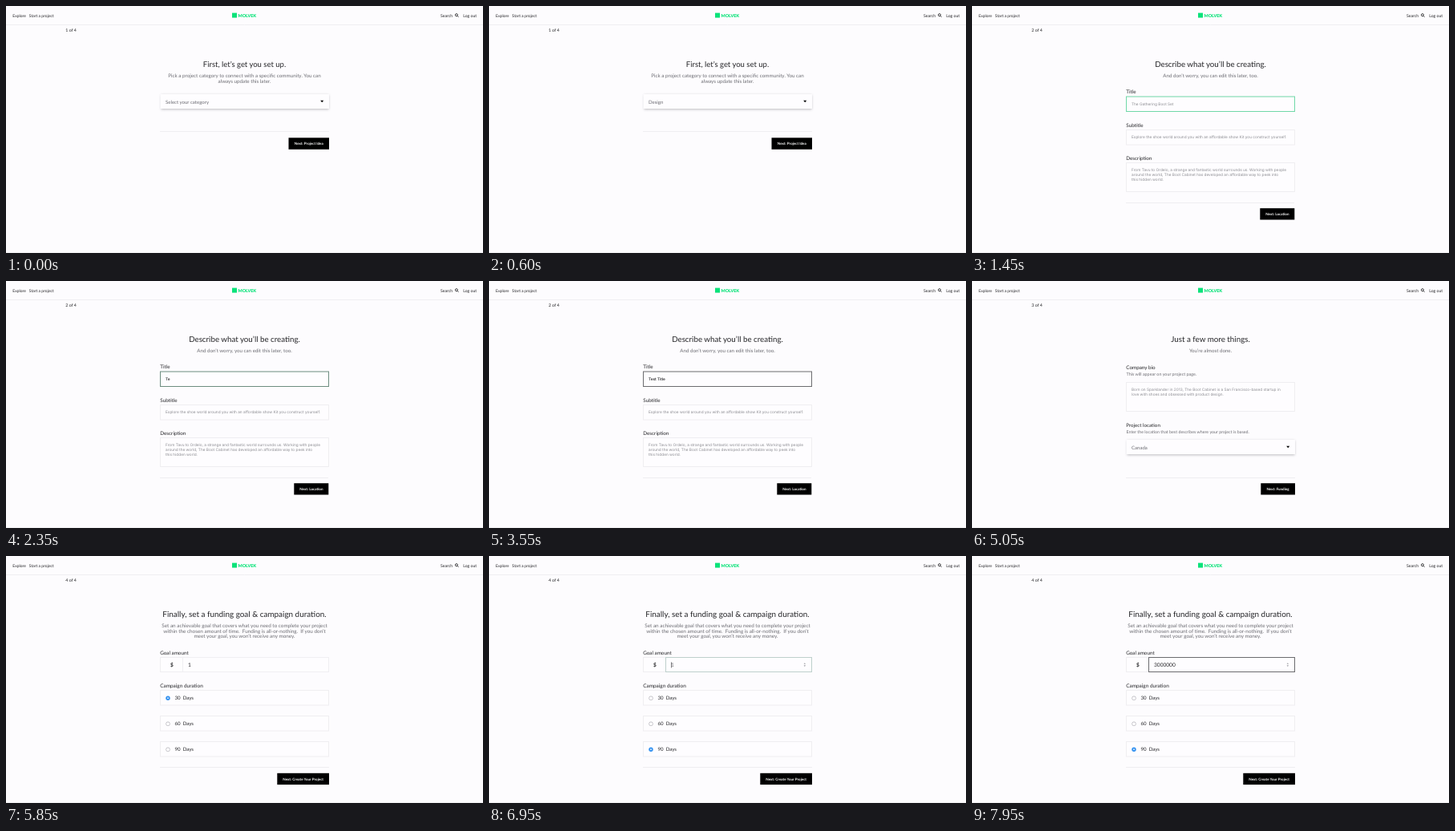
Recreate the animation shown at these times as an HTML page with a canvas. Size 595 by 308 pixels, loop 8000 ms.

```html
<!DOCTYPE html>
<html lang="en">
<head>
<meta charset="utf-8">
<title>Project setup</title>
<style>
html, body { margin: 0; width: 100%; height: 100%; overflow: hidden; background: #fdfcfe; }
canvas { display: block; width: 595px; height: 308px; }
</style>
</head>
<body>
<canvas id="stage"></canvas>
<script>
const W = 595, H = 308, LOOP = 8000;
const LEFT = 192.5, RIGHT = 402.5;
const INK = '#252528', SOFT = '#6c6c72', HINT = '#8c8c91', GREEN = '#0be37a';
const SANS = 'Lato, "Open Sans", sans-serif', FORM = 'Inter, "Liberation Sans", sans-serif';
const PALE = [240, 239, 242], FOCUS = [112, 216, 168], DARK = [108, 108, 111], BLACK = [40, 40, 43];
const LINE = '#efeef1';

const canvas = document.getElementById('stage');
const ctx = canvas.getContext('2d');
const dpr = window.devicePixelRatio || 1;
canvas.width = W * dpr;
canvas.height = H * dpr;

const ramp = (t, a, b) => Math.min(1, Math.max(0, (t - a) / (b - a)));
const ease = k => k * k * (3 - 2 * k);
const mix = (a, b, k) => `rgb(${a.map((v, i) => Math.round(v + (b[i] - v) * k))})`;

// y is the middle of the capital letters
function text(str, x, y, size, color = INK, opt = {}) {
  const { weight = 400, align = 'left', family = SANS } = opt;
  ctx.font = `${weight} ${size}px ${family}`;
  ctx.textAlign = align;
  ctx.fillStyle = color;
  ctx.fillText(str, x, y + size * 0.36);
}

function centred(lines, y, size, color, step = 6.6) {
  lines.forEach((s, i) => text(s, 297.5, y + i * step, size, color, { align: 'center' }));
}

function hint(lines, y) {
  lines.forEach((s, i) => text(s, 199, y + i * 6, 4.76, HINT, { family: FORM }));
}

function rule(x1, x2, y) {
  ctx.strokeStyle = LINE;
  ctx.lineWidth = 1;
  ctx.beginPath();
  ctx.moveTo(x1, y);
  ctx.lineTo(x2, y);
  ctx.stroke();
}

function frame(x, y, right, bottom, color = LINE) {
  ctx.fillStyle = '#fefdff';
  ctx.fillRect(x, y, right - x, bottom - y);
  ctx.strokeStyle = color;
  ctx.lineWidth = 1;
  ctx.strokeRect(x, y, right - x, bottom - y);
}

function triangle(x, y, w, h, color) {
  ctx.fillStyle = color;
  ctx.beginPath();
  ctx.moveTo(x - w / 2, y - h / 2);
  ctx.lineTo(x + w / 2, y - h / 2);
  ctx.lineTo(x, y + h / 2);
  ctx.fill();
}

function disc(x, y, r, color) {
  ctx.fillStyle = color;
  ctx.beginPath();
  ctx.arc(x, y, r, 0, 7);
  ctx.fill();
}

function raised(y, h) {
  ctx.save();
  ctx.shadowColor = 'rgba(30,30,40,.3)';
  ctx.shadowBlur = 3 * dpr;
  ctx.shadowOffsetY = dpr;
  ctx.fillStyle = '#fefdff';
  ctx.fillRect(192.5, y, 210.5, h);
  ctx.restore();
}

function select(y, label, tone) {
  raised(y, 18);
  text(label, 199, y + 9.4, 6.05, mix([108, 108, 114], BLACK, tone));
  triangle(394.2, y + 9, 4, 2.4, '#000');
}

function menu(y, items, open, active) {
  if (open <= 0) return;
  const row = 18, h = Math.min(items.length * row, H - 1 - y) * open;
  raised(y, h);
  ctx.save();
  ctx.beginPath();
  ctx.rect(192, y, 212, h);
  ctx.clip();
  items.forEach((s, i) => {
    if (i === active) {
      ctx.fillStyle = '#f0eff3';
      ctx.fillRect(192.5, y + i * row, 210.5, row);
    }
    text(s, 199, y + i * row + 9, 6.05, SOFT);
  });
  ctx.restore();
}

function button(label, x, y, hover = 0, h = 14.5, right = 403) {
  ctx.fillStyle = mix([0, 0, 0], [42, 42, 42], hover);
  ctx.fillRect(x, y, right - x, h);
  text(label, (x + right) / 2, y + h / 2 + 0.2, 4.5, '#fff', { weight: 700, align: 'center' });
}

function header(step) {
  text('Explore', 8.3, 12, 5);
  text('Start a project', 28.8, 12, 5);
  ctx.fillStyle = GREEN;
  ctx.fillRect(282, 8.6, 6, 6);
  text('MOLVEK', 289.5, 11.7, 5.4, GREEN, { weight: 900 });
  text('Search', 542, 12, 5.15);
  ctx.strokeStyle = INK;
  ctx.lineWidth = 0.9;
  ctx.beginPath();
  ctx.arc(561.9, 11.2, 1.5, 0, 7);
  ctx.moveTo(563, 12.3);
  ctx.lineTo(564.5, 13.8);
  ctx.stroke();
  text('Log out', 570.2, 12, 5.15);
  rule(0, W, 23.5);
  rule(0, W, 307.5);
  text(`${step} of 4`, 74.3, 29.7, 5.3);
}

function categoryPage(t) {
  centred(['First, let’s get you set up.'], 72.3, 9.5, INK);
  centred(['Pick a project category to connect with a specific community. You can',
    'always update this later.'], 87, 6.28, SOFT);
  rule(192, 403, 156.5);
  button('Next: Project Idea', 352.5, 164.3, ramp(t, 750, 950));
  select(110, t < 600 ? 'Select your category' : 'Design', ramp(t, 700, 950));
  const open = ease(ramp(t, 0, 200)) * (1 - ramp(t, 500, 600));
  menu(129, ['Art', 'Comics', 'Crafts', 'Dance', 'Design'], t < 50 ? 0 : open,
    Math.floor(ramp(t, 200, 440) * 4));
}

function ideaPage(t) {
  centred(['Describe what you’ll be creating.'], 72.3, 9.75, INK);
  centred(['And don’t worry, you can edit this later, too.'], 86.8, 6.2, SOFT);
  text('Title', 192.3, 107.2, 6.3);
  const typed = Math.floor(ramp(t, 2190, 2850) * 11);
  const edge = typed
    ? mix(FOCUS, DARK, ramp(t, 2240, 2400))
    : mix(PALE, FOCUS, ease(ramp(t, 1300, 1450)));
  frame(LEFT, 113, RIGHT, 131.5, edge);
  if (typed) {
    text('Test Title'.slice(0, typed), 199, 122, 4.76, '#151517', { family: FORM, weight: 500 });
  } else {
    hint(['The Gathering Boot Set'], 122);
  }
  text('Subtitle', 192.3, 148.7, 6.3);
  frame(LEFT, 154.5, RIGHT, 173);
  hint(['Explore the shoe world around you with an affordable show Kit you construct yourself.'], 163.3);
  text('Description', 192.3, 190, 6.3);
  frame(LEFT, 195.5, RIGHT, 231.5);
  hint(['From Tavu to Ordelo, a strange and fantastic world surrounds us. Working with people',
    'around the world, The Boot Cabinet has developed an affordable way to peek into',
    'this hidden world.'], 204.7);
  rule(192, 402, 245.5);
  button('Next: Location', 359.3, 252.2, ramp(t, 3800, 4000), 14.3, 402.3);
}

function placePage(t) {
  centred(['Just a few more things.'], 72.3, 9.8, INK);
  centred(['You’re almost done.'], 86.8, 6.2, SOFT);
  text('Company bio', 192.3, 107.3, 6.3);
  text('This will appear on your project page.', 192.5, 116, 5.38, SOFT);
  frame(LEFT, 126.5, RIGHT, 162.5);
  hint(['Born on Sparklander in 2013, The Boot Cabinet is a San Francisco-based startup in',
    'love with shoes and obsessed with product design.'], 135.2);
  text('Project location', 192.3, 179.4, 6.2);
  text('Enter the location that best describes where your project is based.', 192.5, 188, 5.32, SOFT);
  rule(192, 403, 245.5);
  button('Next: Funding', 360.3, 252.2, t < 4400 ? 1 - ramp(t, 4100, 4350) : ramp(t, 5150, 5300), 14.3);
  select(198, t < 5050 ? 'Select your country' : 'Canada', ramp(t, 5150, 5300));
  const open = ease(ramp(t, 4650, 4800)) * (1 - ramp(t, 4980, 5050));
  menu(217, ['Australia', 'Austria', 'Belgium', 'Canada', 'Denmark'], t < 4700 ? 0 : open,
    Math.floor(ramp(t, 4800, 4940) * 3));
}

function option(y, label, on) {
  frame(LEFT, y, RIGHT, y + 18.5);
  const cy = y + 9.7;
  if (on) {
    disc(202, cy, 2.7, '#3492f0');
    disc(202, cy, 0.9, '#e9f3ff');
  } else {
    disc(202, cy, 2.6, '#b8b7bd');
    disc(202, cy, 2, '#fefdff');
  }
  text(label, 210.5, cy + 0.1, 6.1);
}

function amount(t) {
  if (t < 7150) return '1';
  const keys = [7400, 7450, 7500, 7700, 7850, 7900];
  return '3' + '0'.repeat(keys.filter(k => t >= k).length);
}

function goalPage(t) {
  centred(['Finally, set a funding goal & campaign duration.'], 72.3, 9.92, INK);
  centred(['Set an achievable goal that covers what you need to complete your project',
    'within the chosen amount of time.  Funding is all-or-nothing.  If you don’t',
    'meet your goal, you won’t receive any money.'], 87, 6.35, SOFT);
  text('Goal amount', 192.2, 120.5, 6.3);
  frame(LEFT, 126.5, RIGHT, 144.5);
  const touch = [190, 208, 204];
  const edge = t < 7050
    ? mix(PALE, touch, ramp(t, 6800, 6950))
    : mix(touch, DARK, ramp(t, 7050, 7200));
  frame(220.5, 126.5, RIGHT, 144.5, edge);
  text('$', 206.8, 135.4, 6.5, INK, { weight: 700, align: 'center' });
  const editing = t >= 6900 && t < 7150;
  text(amount(t), 227, 135.7, 6.6, editing ? '#77767c' : INK);
  if (editing) {
    ctx.fillStyle = INK;
    ctx.fillRect(227, 132.4, 0.6, 7);
  }
  const spin = ramp(t, 6650, 6800);
  if (spin) {
    const grey = mix([254, 253, 255], [150, 150, 156], spin);
    triangle(393.8, 134, 2.4, -1.7, grey);
    triangle(393.8, 137.2, 2.4, 1.7, grey);
  }
  text('Campaign duration', 192.2, 161.8, 6.45);
  const pick = t < 6350 ? 0 : 2;
  [30, 60, 90].forEach((d, i) => option(167.5 + 32 * i, `${d}  Days`, i === pick));
  rule(192, 403, 263.5);
  button('Next: Create Your Project', 338.3, 270.8, 0, 14.3);
}

const pages = [[0, categoryPage], [1100, ideaPage], [4100, placePage], [5850, goalPage]];

function draw(t) {
  ctx.setTransform(dpr, 0, 0, dpr, 0, 0);
  ctx.textRendering = 'geometricPrecision';
  ctx.fillStyle = '#fdfcfe';
  ctx.fillRect(0, 0, W, H);
  const step = pages.filter(p => t >= p[0]).length;
  header(step);
  pages[step - 1][1](t);
}

const start = performance.now();
function tick() {
  draw((performance.now() - start) % LOOP);
  requestAnimationFrame(tick);
}
tick();
</script>
</body>
</html>
```
